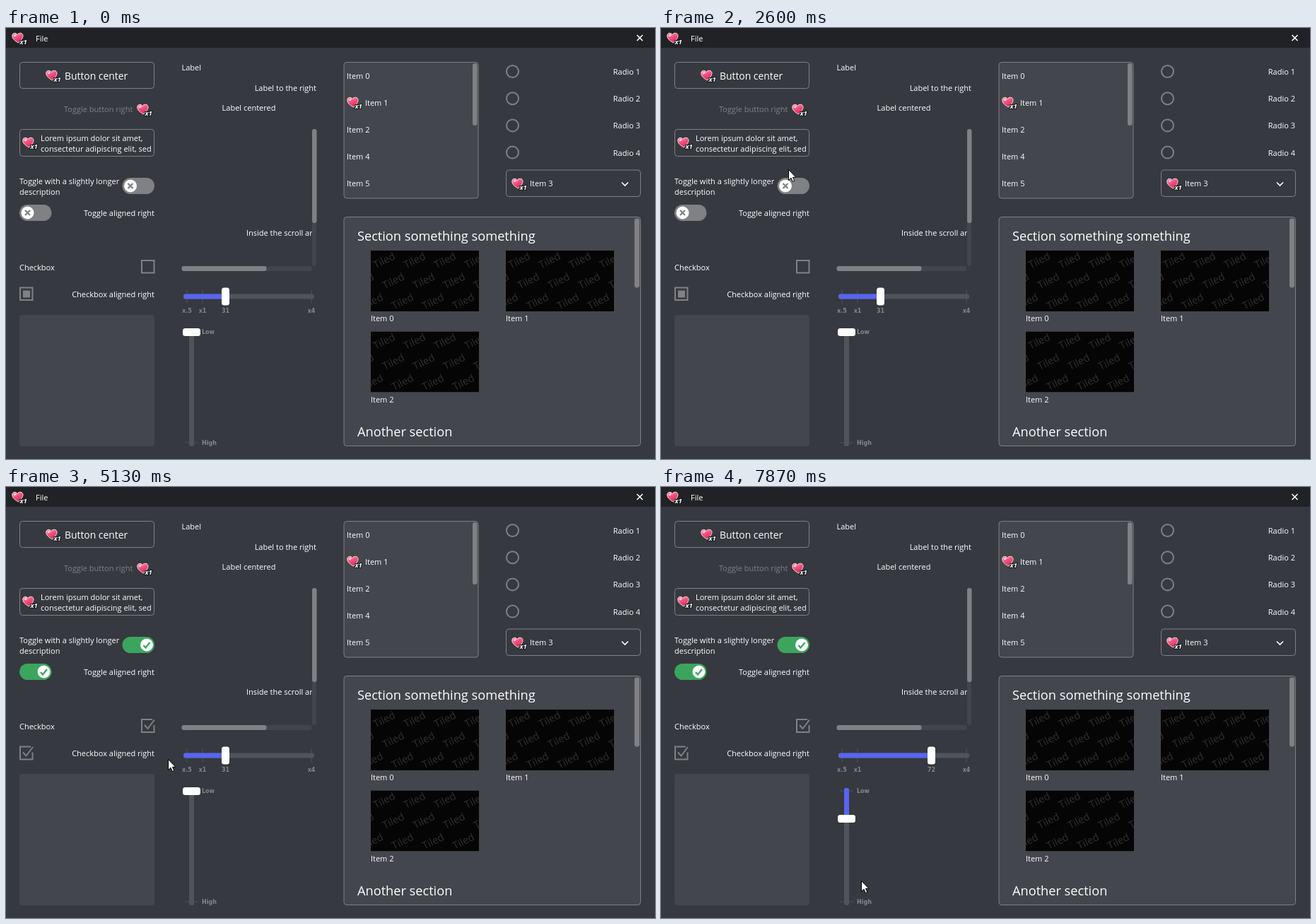
An HTML page that plays this animation: 918 px wide and 610 px high, repeating every 8 s.

```html
<!DOCTYPE html>
<html lang="en">
<head>
<meta charset="utf-8">
<title>Widget demo</title>
<style>
  html, body { margin: 0; width: 100%; height: 100%; overflow: hidden; background: #36393f; }
  svg { display: block; width: 918px; height: 610px; }
  text { font: 11px "Open Sans", "Noto Sans", sans-serif; fill: #fff; }
  .right { text-anchor: end; }
  .mid { text-anchor: middle; }
  .button { font-size: 13.9px; }
  .heading { font-size: 18.2px; }
  .off { fill: #7e8084; }
  .tiny { font: bold 8px "DejaVu Sans", sans-serif; fill: #85878b; }
  .tile { font-size: 14.5px; fill: #303030; text-anchor: middle; }
  .count { font: italic bold 9.5px "Open Sans", sans-serif; stroke: #17181b; stroke-width: 2px; paint-order: stroke; stroke-linejoin: round; }
  .frame { fill: #36393f; stroke: #808184; }
  .panel { fill: #44464d; }
  .panel.edged { stroke: #808184; }
  .thumb { fill: #808184; }
  .track { fill: #42454b; }
  .groove { fill: #4f545c; }
  .fill { fill: #5865f2; }
  .outline { fill: none; stroke: #808184; stroke-width: 2; }
  .white { fill: #fff; }
  .line { fill: none; stroke: #fff; stroke-width: 1.6; }
</style>
</head>
<body>
<svg viewBox="0 0 918 610" xmlns="http://www.w3.org/2000/svg">
  <defs>
    <linearGradient id="pink" x2=".5" y2="1">
      <stop stop-color="#ff9fb8"/><stop offset=".5" stop-color="#f4527f"/><stop offset="1" stop-color="#d92d5d"/>
    </linearGradient>
    <clipPath id="scrollClip"><rect x="249" y="143" width="184" height="193"/></clipPath>
    <clipPath id="thumbClip"><rect width="153" height="86"/></clipPath>
    <g id="heart">
      <path d="M9.500 15C4 12 .8 9 .8 5C.8 .8 6 0 8 3.500C10 0 16 .5 16 5C16 9 12 12 9.500 15Z" fill="url(#pink)" stroke="#f9dce4"/>
      <ellipse cx="4.800" cy="4.500" rx="2" ry="1.400" fill="#ffd3de" transform="rotate(-30 5 4.500)"/>
      <text x="11.500" y="16.500" class="count">x1</text>
    </g>
    <g id="thumbnail" clip-path="url(#thumbClip)"><rect width="153" height="86" fill="#050505"/></g>
  </defs>
  <rect width="918" height="610" fill="#36393f"/>
  <rect width="918" height="28" fill="#202225"/>
  <g id="scene"></g>
  <g id="cursor" stroke="#000" fill="#fff" stroke-linejoin="round">
    <path id="arrow" d="M.5 .5V15.500L4 12.200L6.300 17.500L8.800 16.400L6.500 11.300H10.800Z"/>
    <path id="resize" d="M-9.500 0L-5 -4.500V-1.300H5V-4.500L9.500 0L5 4.500V1.300H-5V4.500Z"/>
  </g>
</svg>
<script>
const LOOP = 8000, STEP = 200 / 3;
const ROW = 38.2, WIDTH = 190;
const [A, B, C, D] = [0, 1, 2, 3].map(i => 19 + 229.5 * i);
const $ = id => document.getElementById(id);
const scene = $("scene");

function add(tag, attrs, parent = scene) {
  const node = document.createElementNS("http://www.w3.org/2000/svg", tag);
  for (const key in attrs) node.setAttribute(key, attrs[key]);
  return parent.appendChild(node);
}
function box(x, y, width, height, rx, cls) {
  return add("rect", { x, y, width, height, rx, class: cls });
}
function label(text, x, y, cls = "") {
  const node = add("text", { x, y, class: cls });
  node.textContent = text;
  return node;
}
function use(id, x, y) { add("use", { href: "#" + id, x, y }); }
function show(node, on) { node.style.display = on ? "" : "none"; }

function titleBar() {
  const hover = box(34, 0, 33, 28, 0, "frame");
  hover.style.stroke = "none";
  use("heart", 8, 6);
  label("File", 42, 19);
  add("path", { d: "M892.5 10l8 8m0 -8l-8 8", class: "line" });
  return hover;
}

function makeToggle(x, y) {
  const pill = box(x, y, 45.5, 23, 11.5, "");
  const knob = add("g", {});
  add("circle", { r: 9, class: "white" }, knob);
  const mark = add("path", { fill: "none", "stroke-width": 2.3 }, knob);
  return on => {
    const color = on ? "#3ba55d" : "#808184";
    pill.setAttribute("fill", color);
    mark.setAttribute("stroke", color);
    mark.setAttribute("d", on ? "M-4.500 .5l3 3.500l6 -7.500" : "M-3.500 -3.500l7 7m0 -7l-7 7");
    knob.setAttribute("transform", `translate(${x + (on ? 34.5 : 11.5)} ${y + 11.5})`);
  };
}

function makeCheckbox(x, y, partial) {
  const path = add("path", { class: "outline", transform: `translate(${x} ${y})` });
  const square = box(x + 5, y + 5, 10, 10, 0, "thumb");
  return on => {
    path.setAttribute("d", on ? "M16 1H1V19H18.500V9M5 9l4.500 5l9.500 -12.500" : "M1 1H18.500V18.500H1Z");
    show(square, partial && !on);
  };
}

function makeSlider(vertical) {
  // Both sliders share one layout; the vertical one swaps the axes.
  const bar = (pos, cross, length, size, rx, cls) => vertical
    ? box(cross, pos, size, length, rx, cls) : box(pos, cross, length, size, rx, cls);
  const start = vertical ? 426 : 251, center = vertical ? 262.5 : 380;
  const ticks = vertical ? { Low: 430, High: 587 } : { "x.5": 256, x1: 278, x4: 432 };
  for (const text in ticks) {
    bar(ticks[text] - .5, center - 9.5, 1, 19, 0, "groove");
    if (vertical) label(text, 277, ticks[text] + 3, "tiny");
    else label(text, ticks[text], 403, "tiny mid");
  }
  bar(start, center - 3.5, vertical ? 166 : 185, 7, 3, "groove");
  const fill = bar(start, center - 3.5, 0, 7, 3, "fill");
  const knob = bar(0, center - 12.5, 11, 25, 3.5, "white");
  return pos => {
    fill.setAttribute(vertical ? "height" : "width", Math.max(0, pos - start));
    knob.setAttribute(vertical ? "y" : "x", pos - 5.5);
  };
}

function buttons() {
  box(A + .5, 48.5, WIDTH, 37, 4, "frame");
  use("heart", 56, 59);
  label("Button center", 83, 73, "button");
  label("Toggle button right", 82, 119, "off");
  use("heart", 185, 107);
  const lorem = box(A + .5, 143.5, WIDTH, 38, 4, "frame");
  use("heart", 23, 154);
  label("Lorem ipsum dolor sit amet,", 49, 160);
  label("consectetur adipiscing elit, sed", 49, 175);
  return lorem;
}

function switchLabels() {
  label("Toggle with a slightly longer", A, 221);
  label("description", A, 236);
  label("Toggle aligned right", A + 191, 266, "right");
  label("Checkbox", A, 343);
  label("Checkbox aligned right", A + 191, 381, "right");
  box(A, 406, 191, 186, 4, "panel");
}

function scrollArea() {
  label("Label", B, 60);
  label("Label to the right", B + 190.5, 89, "right");
  label("Label centered", B + 95, 117, "mid");
  label("Inside the scroll area", 340, 294).setAttribute("clip-path", "url(#scrollClip)");
  box(433, 143, 6, 194, 3, "track");
  box(433, 143, 6.5, 133, 3, "thumb");
  box(B, 337, 184, 7, 3, "track");
  box(B, 337, 120, 7, 3, "thumb");
}

function choices() {
  box(C, 48.5, WIDTH, 192.5, 4, "panel edged");
  box(660, 50, 6.5, 88, 3, "thumb");
  for (let i = 0; i < 5; i++) {
    label("Item " + (i < 3 ? i : i + 1), C + (i === 1 ? 30 : 4), Math.round(71.5 + ROW * i));
  }
  use("heart", C + 4, 97);
  for (let i = 0; i < 4; i++) {
    add("circle", { cx: D + 9, cy: 61.5 + ROW * i, r: 8.5, class: "outline" });
    label("Radio " + (i + 1), D + 189.5, Math.round(66 + ROW * i), "right");
  }
  box(D, 201, WIDTH, 37.5, 4, "frame");
  use("heart", D + 7.5, 212);
  label("Item 3", 741, 224);
  add("path", { d: "M871 218.500l4.500 4.500l4.500 -4.500", class: "line" });
}

function gallery() {
  box(C, 267.5, D + WIDTH - C, 324, 4, "panel edged");
  box(889, 269.5, 7, 98, 3, "thumb");
  label("Section something something", C + 19, 301, "heading");
  label("Another section", C + 19, 578, "heading");
  for (let row = 0; row < 3; row++) {
    for (let k = -1; k < 4; k++) {
      const place = `translate(${19 + 13 * row + 43 * k} ${14 + 29 * row}) rotate(-27)`;
      add("text", { class: "tile", y: 5, transform: place }, $("thumbnail")).textContent = "Tiled";
    }
  }
  for (let i = 0; i < 3; i++) {
    const x = 516 + 191 * (i % 2), y = 315 + 114.5 * (i >> 1);
    use("thumbnail", x, y);
    label("Item " + i, x, Math.floor(y + 100.5));
  }
}

const fileHover = titleBar();
const lorem = buttons();
switchLabels();
const toggles = [makeToggle(A + 145.5, 212), makeToggle(A, 250)];
const checks = [makeCheckbox(A + 172, 328, false), makeCheckbox(A, 366.5, true)];
scrollArea();
const slideH = makeSlider(false), slideV = makeSlider(true);
const value = label("", 0, 403, "tiny mid");
choices();
gallery();

const drag = { from: 6390, to: 6800 };

// Each pointer move: start, end, x, y and an optional downward bow.
const moves = [
  [600, 1400, 283, 161, 70],
  [1600, 2070, 176, 180],
  [2330, 2600, 180, 200],
  [2600, 2930, 187, 217],
  [3000, 3330, 24, 259],
  [3730, 4070, 185, 345],
  [4070, 4270, 198, 341],
  [4270, 4730, 25, 377, 10],
  [5000, 5130, 229, 385],
  [5130, 5270, 377, 396],
  [5270, 5470, 322, 381],
  [5600, 5730, 297, 382],
  [5800, 6200, 312, 384],
  [drag.from, drag.to, 382, 380],
  [6870, 7200, 279, 478],
  [7200, 7530, 261, 496],
  [7600, 7870, 283, 557]
];

function ease(from, to, t) {
  const u = Math.min(1, Math.max(0, (t - from) / (to - from)));
  return u * u * (3 - 2 * u);
}

function pointer(t) {
  let x = 45, y = 12;
  for (const [from, to, toX, toY, bow = 0] of moves) {
    const u = ease(from, to, t);
    x += (toX - x) * u;
    y += (toY - y) * u + 4 * bow * u * (1 - u);
  }
  return [Math.round(x), Math.round(y)];
}

function render(time) {
  // The picture advances 15 times a second, on a 10 ms grid.
  const t = Math.round(Math.floor((time + 3.4) / STEP) * STEP / 10) * 10;
  const [x, y] = pointer(t);
  const resizing = t >= 6000 && t < 6900;
  $("cursor").setAttribute("transform", `translate(${x} ${y})`);
  show($("cursor"), t >= 130);
  show($("arrow"), !resizing);
  show($("resize"), resizing);
  show(fileHover, t >= 130 && x < 67 && y < 28);
  lorem.style.fill = x <= 210 && y >= 143 && y <= 181 ? "#40444b" : "";

  toggles[0](t >= 2930);
  toggles[1](t >= 3670);
  checks[0](t >= 4270);
  checks[1](t >= 5000);

  const knob = Math.round(310 + 72 * ease(drag.from, drag.to, t)) + .5;
  slideH(knob);
  value.setAttribute("x", knob);
  value.textContent = Math.round((knob - 256) / 1.757);
  slideV(t >= 7330 ? 469.5 : 430.5);
  if (t < 7330) slideV.hidden;
}

const start = performance.now();
function tick() {
  render((performance.now() - start) % LOOP);
  requestAnimationFrame(tick);
}
tick();
</script>
</body>
</html>
```
